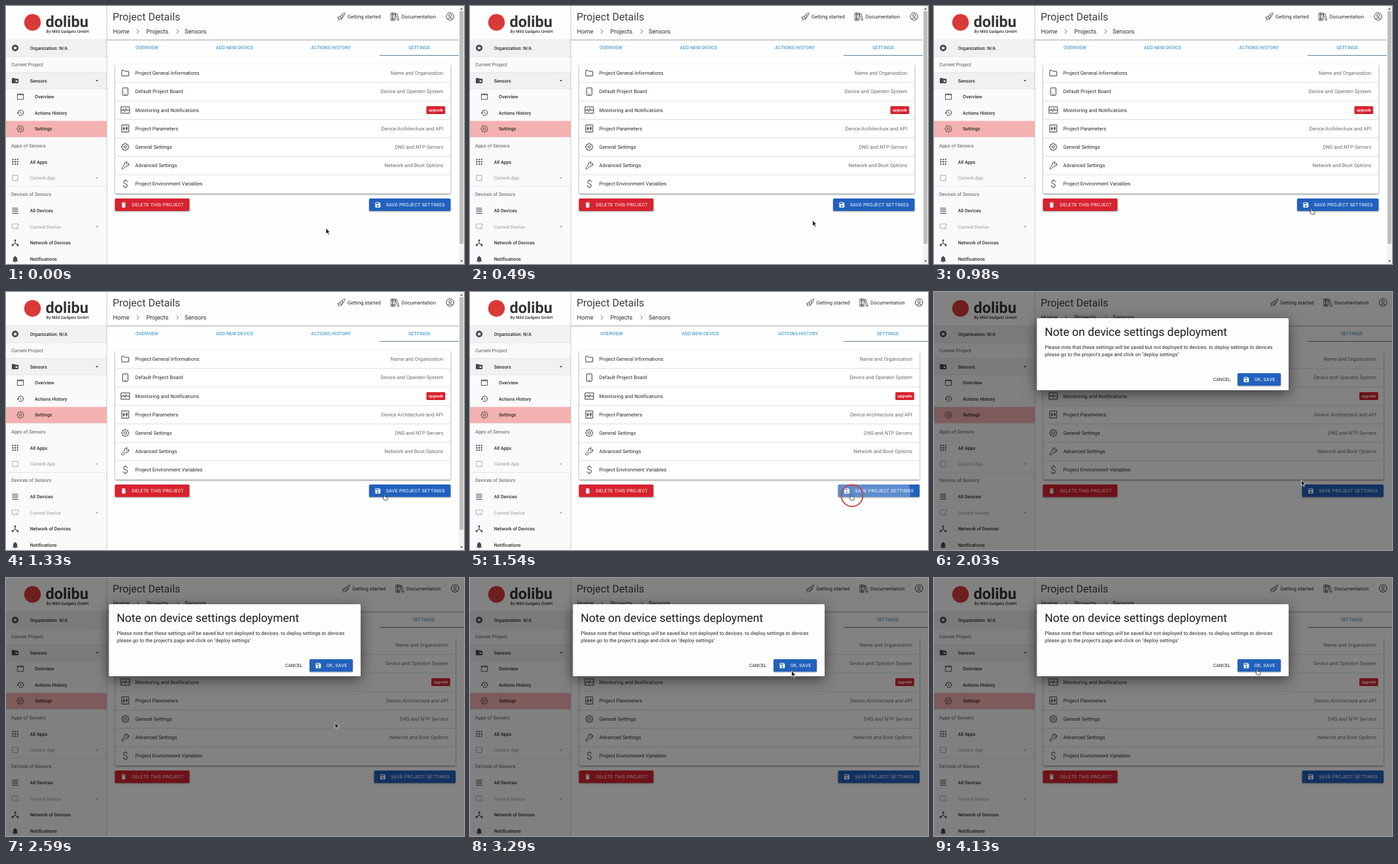
An HTML page for the animation above (4.69 s loop, 700 by 394 pixels).

```html
<!DOCTYPE html>
<html lang="en">
<head>
<meta charset="utf-8">
<title>Project settings</title>
<style>
  html, body { margin: 0; width: 100%; height: 100%; overflow: hidden; background: #fefefe; }
  svg { display: block; width: 100vw; height: 100vh; }
  text { font-family: Roboto, Arial, sans-serif; text-rendering: geometricPrecision; white-space: pre; }
  .medium { font-weight: 500; }
  .button { letter-spacing: .26px; }
  .raised { filter: drop-shadow(0 1px 1px rgba(0,0,0,.4)); }
  .panel { filter: drop-shadow(0 1px 1.2px rgba(0,0,0,.55)); }
  .modal { filter: drop-shadow(0 5px 10px rgba(0,0,0,.55)); }
</style>
</head>
<body>
<svg id="stage" viewBox="0 0 700 394" preserveAspectRatio="none"></svg>
<script>
const LOOP = 4690, STEP = 70, SHIFT = 7.6;
const INK = '#2a2a2a', GREY = '#6a6a6a', PALE = '#a9a9a9', RED = '#d8222f', BLUE = '#2161bd', LINK = '#2388c8';

// Gear outline in a 24-unit box: eight flat teeth around a ring.
const gear = 'M' + Array.from({ length: 32 }, (_, i) => {
  const a = (i - .5) * Math.PI / 16, r = i % 4 < 2 ? 10.5 : 8;
  return (12 + r * Math.sin(a)).toFixed(1) + ' ' + (12 - r * Math.cos(a)).toFixed(1);
}).join('L') + 'zM12 8.5a3.5 3.5 0 1 0 0 7 3.5 3.5 0 0 0 0-7z';

const grid = [3, 10, 17].flatMap(x => [3, 10, 17].map(y => `M${x} ${y}h4v4h-4z`)).join('');

const LINES = {
  gear,
  folder: 'M2 5q0-1 1-1h6l2.5 3H21q1 0 1 1v11q0 1-1 1H3q-1 0-1-1z',
  tablet: 'M6 1.5h12q1.5 0 1.5 1.5v18q0 1.5-1.5 1.5H6Q4.5 22.5 4.5 21V3Q4.5 1.5 6 1.5zM10 19.5h4',
  pulse: 'M0 3h24v18H0zM0 12.5h6l2-3 3 7 3-9 2 5h8',
  sliders: 'M2 2h20v20H2zM8 6v5M6 11h4v3H6zM8 14v4M16 6v4M14 10h4v3h-4zM16 13v5',
  wrench: 'M21.5 6l-4 3.5-3-3 3.5-4a6.3 6.3 0 0 0-8.5 8L2.5 17.500a2.8 2.8 0 0 0 4 4l7-7a6.3 6.3 0 0 0 8-8.5z',
  window: 'M3 4h18v16H3zM3 6.5h18',
  box: 'M4 4h16v16H4z',
  viewer: 'M22 10V4H2v12h9M7 20h5M13 16q4.5-6 9 0-4.5 6-9 0zM17 16h1',
  rocket: 'M9 14C10 8 15 3 22 2c0 7-5 12-11 14zM10 11l-5 1-3 4h5M12 16l-1 4 4-3 2-5M15 8h2v2h-2zM7 17l-5 5M8 19l-2 3',
  books: 'M1 2h5v20H1zM6 2h6v20H6zM1 6h11M1 18h11M13 4l4-1 6 18-4 1z',
  user: 'M12 1a11 11 0 1 0 0 22 11 11 0 0 0 0-22zM12 6a3.7 3.7 0 1 0 0 7.4A3.7 3.7 0 0 0 12 6zM4.5 19.5q7.5-6 15 0',
  chevron: 'M8 4l8 8-8 8'
};
const SOLIDS = {
  grid,
  list: 'M3 4h18v2H3zM3 9h18v2H3zM3 14h18v2H3zM3 19h18v2H3z',
  star: 'M12 2a10 10 0 1 0 0 20 10 10 0 0 0 0-20zM12 6l1.7 4.1 4.5.4-3.4 3 1 4.4-3.8-2.4-3.8 2.4 1-4.4-3.4-3 4.5-.4z',
  folderStar: 'M10 4l2 2h8q2 0 2 2v10q0 2-2 2H4q-2 0-2-2V6q0-2 2-2zM16 9l1.2 2.8 3 .2-2.3 2 .7 3-2.6-1.6-2.6 1.6.7-3-2.3-2 3-.2z',
  history: 'M13 3a9 9 0 0 0-9 9H1l4 4 4-4H6a7 7 0 1 1 2 5l-1.4 1.4A9 9 0 1 0 13 3zM12 8v5l4.3 2.5.7-1.3-3.5-2V8z',
  tree: 'M12 2a3 3 0 0 0-1 5.8V12l-5 4.2a3 3 0 1 0 1.3 1.5L12 14l4.7 3.7a3 3 0 1 0 1.3-1.5L13 12V7.8A3 3 0 0 0 12 2z',
  bell: 'M12 22a2 2 0 0 0 2-2h-4a2 2 0 0 0 2 2zM18 16v-5c0-3-1.6-5.6-4.5-6.3V4a1.5 1.5 0 0 0-3 0v.7C7.6 5.4 6 8 6 11v5l-2 2v1h16v-1z',
  caret: 'M7 10l5 5 5-5z',
  trash: 'M6 7h12v12q0 2-2 2H8q-2 0-2-2zM19 4h-3.5l-1-1h-5l-1 1H5v2h14z',
  save: 'M17 3H5q-2 0-2 2v14q0 2 2 2h14q2 0 2-2V7zM12 19a3 3 0 1 1 0-6 3 3 0 0 1 0 6zM15 9H5V5h10z'
};

const text = (x, y, str, size = 7.69, fill = INK, attrs = '') =>
  `<text x="${x}" y="${y + size * .355}" font-size="${size}" fill="${fill}" ${attrs}>${str}</text>`;
const rect = (x, y, w, h, fill, attrs = '') =>
  `<rect x="${x}" y="${y}" width="${w}" height="${h}" fill="${fill}" ${attrs}/>`;
const icon = (x, y, name, color = '#3a3a3a', size = 12.3, weight = 1.8) => {
  const paint = LINES[name]
    ? `fill="none" stroke="${color}" stroke-width="${weight}" stroke-linejoin="round"`
    : `fill="${color}" fill-rule="evenodd"`;
  return `<path transform="translate(${x} ${y}) scale(${size / 24}) translate(-12 -12)" d="${LINES[name] || SOLIDS[name]}" ${paint}/>`;
};
const button = (x, y, w, fill, name, label) =>
  rect(x, y, w, 19, fill, 'rx="1.5" class="raised"') + icon(x + 13.3, y + 9.7, name, '#fff', 10.5) +
  text(x + 25.7, y + 9.5, label, 7.17, '#fff', 'class="button"');

function sidebar() {
  const item = (y, name, label, sub = 0, color = INK) =>
    icon(sub ? 22 : 14, y, name, color === PALE ? PALE : '#484848', 12.3) +
    text(sub ? 44 : 36.7, y, label, 7.17, color, 'class="medium"');
  const heading = (y, label) => text(8, y, label, 7.3, '#555');
  const italic = '<tspan font-style="italic">Sensors</tspan>';
  const line = y => rect(0, y, 154, .6, '#dcdcdc');
  return rect(0, 0, 154, 394, '#fafafa') + rect(0, 0, 154, 51.5, '#fefefe') +
    rect(0, 51.5, 154, 25.5, '#f1f1f1') + rect(0, 101.5, 154, 25, '#f1f1f1') + rect(0, 175.5, 154, 24.7, '#f4b1b1') +
    [51.5, 77, 101.5, 126.3, 200.2, 275].map(line).join('') +
    '<circle cx="40.5" cy="25" r="12.7" fill="#d93a38"/>' +
    text(60.5, 24, 'dolibu', 23.5, '#333', 'font-weight="700"') +
    text(61.5, 39, 'By Mild Gadgets GmbH', 6.25, '#333', 'class="medium"') +
    item(64, 'star', 'Organization: N/A') + heading(89.3, 'Current Project') +
    item(114, 'folderStar', 'Sensors') + icon(139, 114, 'caret', '#555', 11) +
    item(138.5, 'window', 'Overview', 1) + item(163, 'history', 'Actions History', 1) + item(187.6, 'gear', 'Settings', 1) +
    heading(213.3, 'Apps of ' + italic) + item(238, 'grid', 'All Apps') +
    item(262.6, 'box', 'Current App', 0, PALE) + icon(139, 262.6, 'caret', PALE, 11) +
    heading(287.7, 'Devices of ' + italic) + item(312.3, 'list', 'All Devices') +
    item(337, 'viewer', 'Current Device', 0, PALE) + icon(139, 337, 'caret', PALE, 11) +
    item(361.7, 'tree', 'Network of Devices') + item(386.6, 'bell', 'Notifications') +
    rect(153.6, 0, .9, 394, '#c4c4c4');
}

function scrollbar() {
  return rect(692.3, 0, 7.7, 394, '#f1f1f1') + rect(693.3, 8, 5.7, 355, '#bcbcbc') +
    '<path d="M694 5.5l2.2-2.5 2.2 2.5zM694 388.5l2.2 2.5 2.2-2.5z" fill="#555"/>';
}

// dx is how far the right edge moves when the scrollbar is gone.
function page(dx) {
  const wide = dx / SHIFT, right = 692.4 + dx;
  const rows = [
    ['folder', 'Project General Informations', 'Name and Organization'],
    ['tablet', 'Default Project Board', 'Device and Operatin System'],
    ['pulse', 'Monitoring and Notifications', ''],
    ['sliders', 'Project Parameters', 'Device Architecture and API'],
    ['gear', 'General Settings', 'DNS and NTP Servers'],
    ['wrench', 'Advanced Settings', 'Network and Boot Options'],
    ['', 'Project Environment Variables', '']
  ].map(([name, label, note], i) => {
    const y = 102.5 + 28.2 * i;
    return (i ? rect(167, y - 14.2, 512.5 + dx, .7, '#cfcfcf') : '') +
      (name ? icon(182.3, y, name, '#333', 13) : text(182.3, y, '$', 15.5, '#333', 'text-anchor="middle" font-weight="300"')) +
      text(197.5, y, label) + text(668.3 + dx, y, note, 7.69, GREY, 'text-anchor="end"');
  }).join('');
  const tabs = [['OVERVIEW', 215.3, 1], ['ADD NEW DEVICE', 349.4, 2.8], ['ACTIONS HISTORY', 496.5, 5], ['SETTINGS', 631.5, 6.8]]
    .map(([label, x, move]) => text(x + move * wide, 63.5, label, 7.17, LINK, 'text-anchor="middle"')).join('');
  return rect(0, 0, 700, 394, '#fefefe') + sidebar() +
    text(163, 16.3, 'Project Details', 16, '#3c3c3c') +
    text(163.5, 38.5, 'Home', 9.22) + icon(201.5, 39, 'chevron', INK, 9) +
    text(214.5, 38.5, 'Projects', 9.22) + icon(262.3, 39, 'chevron', INK, 9) + text(273, 38.5, 'Sensors', 9.22) +
    icon(512.3 + dx, 16.3, 'rocket', '#333', 13.5, 1.4) + text(521.7 + dx, 16.3, 'Getting started') +
    icon(594.5 + dx, 16.3, 'books', '#333', 13.5, 1.4) + text(604.5 + dx, 16.3, 'Documentation') +
    icon(678.7 + dx, 16, 'user', '#333', 12.5) +
    rect(154.5, 51.4, right - 154.5, 1, '#9c9c9c') + rect(154.5, 52.4, right - 154.5, 1, '#e4e4e4') +
    tabs + rect(571, 74.9, right - 571, 1, '#5d7f97') +
    rect(167, 89, 512.5 + dx, 197.5, '#fff', 'rx="1" class="panel"') + rows +
    rect(642.5 + dx, 153, 28.8, 12, RED, 'rx="1.5"') +
    text(656.9 + dx, 159, 'upgrade', 6.15, '#fff', 'class="medium" text-anchor="middle"') +
    button(166.5, 294, 113.8, RED, 'trash', 'DELETE THIS PROJECT') +
    button(555 + dx, 294, 124.5, BLUE, 'save', 'SAVE PROJECT SETTINGS') +
    (dx ? '' : scrollbar());
}

const dialog = rect(0, 0, 700, 394, '#000', 'opacity=".49"') +
  rect(157.3, 40, 384.7, 110, '#fdfdfd', 'rx="1.5" class="modal"') +
  text(169.3, 60.8, 'Note on device settings deployment', 17.5, '#1c1c1c') +
  text(169.3, 84.2, 'Please note that these settings will be saved but not deployed to devices. to deploy settings to devices') +
  text(169.3, 95.6, 'please go to the project\'s page and click on "deploy settings"') +
  text(426.5, 133.5, 'CANCEL', 7.17) + button(464, 124, 66, BLUE, 'save', 'OK, SAVE');

const get = id => document.getElementById(id);
get('stage').innerHTML =
  `<clipPath id="clip">${rect(555, 294, 124.5, 19, '#000', 'rx="1.5" id="clipBox"')}</clipPath>
  <g id="narrow">${page(0)}</g><g id="wide">${page(SHIFT)}</g>
  <g clip-path="url(#clip)"><circle id="ripple" cy="311" fill="#fff"/></g>
  <g id="dialog">${dialog}</g>
  <circle id="ring" cx="584" cy="311" r="16.5" fill="none" stroke="#c4453f" stroke-width="1.8"/>
  <g id="cursor">
    <path id="arrow" d="M-2.5-4.2v8.7l2-1.8 1.5 3.3 1.5-.7-1.5-3.1h2.7z" fill="#111" stroke="#fff" stroke-width=".7"/>
    <path id="hand" d="M-1.4-4.5c.8 0 1 .4 1 1v2.5l3.3.8c.8.2 1 .8.9 1.5l-.5 3.2h-4.3l-2.6-3.4.6-.7 1 .6v-4.5c0-.6.2-1 .6-1z" fill="#fff" stroke="#222" stroke-width=".75"/>
  </g>`;

// Pointer path: time, x, y.
const path = [[0, 491.5, 343.5], [210, 491.5, 343.5], [910, 578, 313.5], [1260, 578, 313.5], [1540, 583.5, 313.5],
  [1890, 583.5, 313.5], [2450, 505.5, 225], [2800, 505.5, 225], [3290, 494, 146], [3360, 495, 143.5], [LOOP, 495, 143.5]];

function pointer(t) {
  const i = path.findIndex(p => p[0] > t), a = path[i - 1], b = path[i];
  const k = (t - a[0]) / (b[0] - a[0]);
  return [a[1] + (b[1] - a[1]) * k, a[2] + (b[2] - a[2]) * k];
}

const show = (id, on) => get(id).setAttribute('visibility', on ? 'visible' : 'hidden');
const clamp = (v, max = 1) => Math.max(0, Math.min(max, v));

function draw(now) {
  const t = Math.floor(now % LOOP / STEP) * STEP;
  const wide = t >= 1540, hand = t >= 840 && t < 1960 || t >= 3360;
  show('narrow', !wide);
  show('wide', wide);
  show('dialog', t >= 1610);
  show('ring', t >= 1470 && t < 1610);
  show('arrow', !hand);
  show('hand', hand);
  get('clipBox').setAttribute('x', wide ? 555 + SHIFT : 555);
  const ripple = get('ripple');
  ripple.setAttribute('cx', wide ? 584 : 580);
  ripple.setAttribute('r', 89 * clamp((t - 1400) / 140, 1.3));
  ripple.setAttribute('opacity', .27 * clamp((2030 - t) / 280));
  get('cursor').setAttribute('transform', `translate(${pointer(t)})`);
  requestAnimationFrame(draw);
}
draw(0);
</script>
</body>
</html>
```
